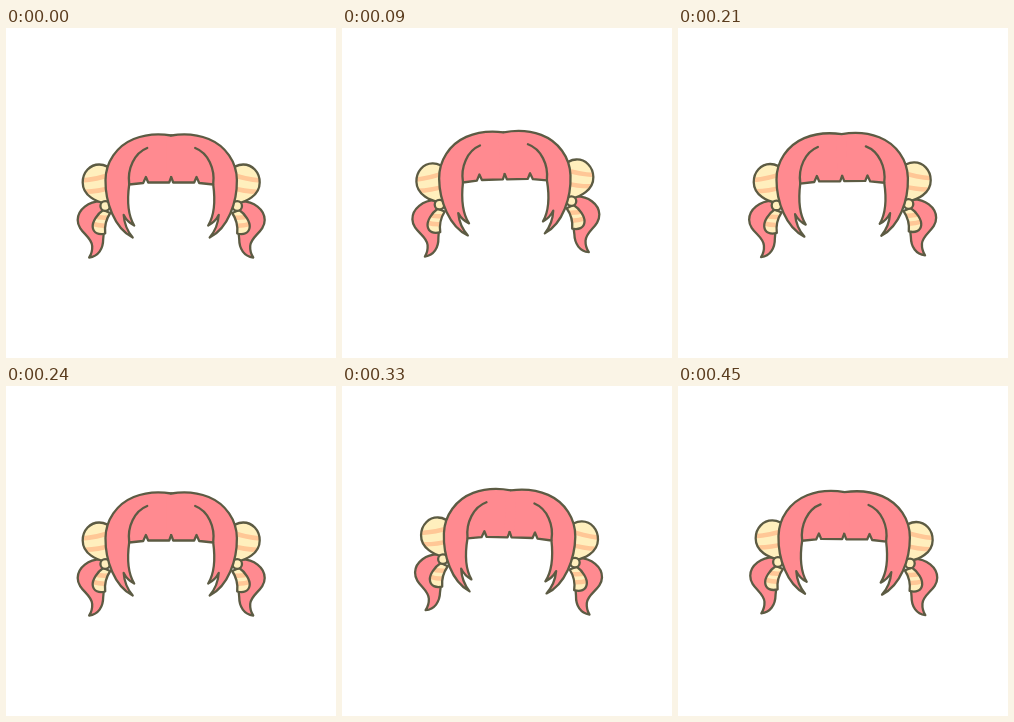
Animation of 330 by 330 pixels, one loop 480 ms. Source, as an HTML page:

```html
<!DOCTYPE html>
<html lang="en">
<head>
<meta charset="utf-8">
<title>Bouncing pigtails</title>
<style>
  html, body { margin: 0; width: 100%; height: 100%; overflow: hidden; background: #fff; }
  svg { display: block; width: 100vw; height: 100vh; }
  .line { stroke: #5c5b43; stroke-width: 2.3; stroke-linejoin: round; stroke-linecap: round; }
  .pink { fill: #ff8a90; }
  .cream { fill: #ffefbd; }
  .stripe { fill: none; stroke: #ffc796; stroke-width: 4.5; }
  .none { fill: none; }
</style>
</head>
<body>
<svg viewBox="0 0 330 330">
  <defs>
    <path id="bow" d="M98 175C91 174 76.500 168 76.500 154.500C76.500 144 84 136.500 93 136.500C99 136.500 104 140 107 144L104 172Z"/>
    <path id="ribbon" d="M97 182C91 186 86 194 86.500 199C87 205.500 93 207 99 205.500C98 197 100 191 104 185Z"/>
    <clipPath id="inBow"><use href="#bow"/></clipPath>
    <clipPath id="inRibbon"><use href="#ribbon"/></clipPath>
    <g id="half">
      <path class="pink line" d="M97 173.500C82 172.500 71.500 182 71.500 192C71.500 204 85.500 208 86 218C86.300 223 85 226.500 83 229.500C92 228.500 97 221 97 211L100 180Z"/>
      <use href="#bow" class="cream"/>
      <path class="stripe" clip-path="url(#inBow)" d="M75 152.500Q90 151.500 106 146M75 163.500Q88 164.500 106 159.500"/>
      <use href="#bow" class="none line"/>
      <use href="#ribbon" class="cream"/>
      <path class="stripe" clip-path="url(#inRibbon)" d="M84 187Q94 191 106 189M84 195Q94 199 106 197"/>
      <use href="#ribbon" class="none line"/>
      <circle class="cream line" cx="99" cy="178" r="4.800"/>
      <path class="pink line" d="M165 107.500C153 105.500 140 106 127.500 111C110.500 118 99.500 134 99.300 152C99 174 108 200 126.500 209.500C121 203 118 195 117.500 187C120 192 123 195 128 197.500C121 186 121 171 123 156.500L137 155L139.700 149L142 154.500L163 154.500L165 149"/>
      <path class="none line" d="M123 156C121 141 128 125 141 120"/>
    </g>
  </defs>
  <g id="wig">
    <use href="#half"/>
    <use href="#half" transform="translate(330) scale(-1 1)"/>
    <rect class="pink" x="160" y="109" width="10" height="38.500"/>
  </g>
</svg>
<script>
  const LOOP = 480, STEP = 30;
  const wig = document.getElementById('wig');

  function draw(now) {
    const time = Math.floor((now % LOOP) / STEP) * STEP;
    const sway = Math.sin(time / LOOP * Math.PI * 2);
    const lift = 3.4 * Math.abs(sway);
    wig.setAttribute('transform', `translate(0.2 ${-lift}) rotate(${-1.65 * sway} 165 242)`);
    requestAnimationFrame(draw);
  }
  draw(0);
</script>
</body>
</html>
```
